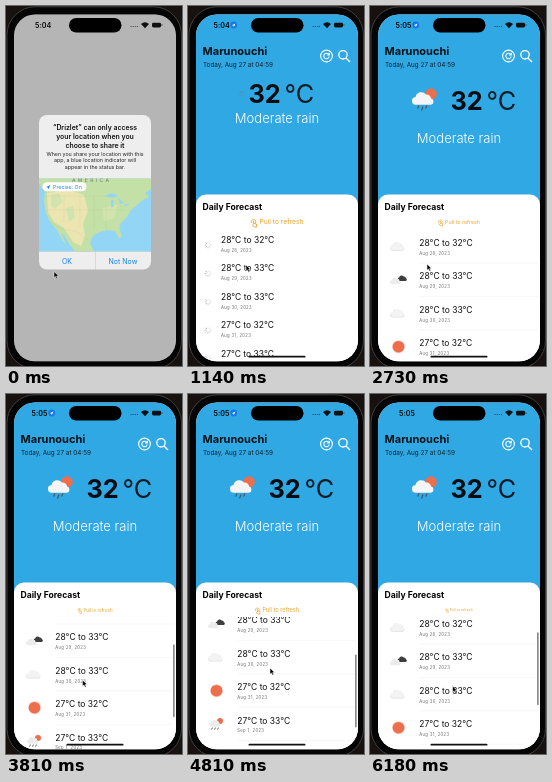
An HTML page for the animation above (6230 ms loop, 176 by 360 pixels).

```html
<!DOCTYPE html>
<html lang="en">
<head>
<meta charset="utf-8">
<title>Forecast app</title>
<style>
  html, body { margin: 0; width: 100%; height: 100%; overflow: hidden; background: #171210; }
  svg { display: block; width: 100vw; height: 100vh; }
  text { font-family: Inter, "Liberation Sans", sans-serif; }
  .b { font-weight: 700; }
  .mid { text-anchor: middle; }
</style>
</head>
<body>
<svg viewBox="0 0 176 360">
  <defs>
    <clipPath id="screen"><rect x="8" y="8.500" width="162" height="346.800" rx="21"/></clipPath>
    <clipPath id="listArea"><rect x="8" y="223" width="162" height="133"/></clipPath>
    <clipPath id="card"><rect x="33" y="109" width="112" height="154.500" rx="8"/></clipPath>
    <clipPath id="mapArea"><rect x="33" y="172.500" width="112" height="73"/></clipPath>
    <path id="cloud" d="M-6 4.500a3 3 0 0 1-.5-6a4.500 4.500 0 0 1 8-2a3.500 3.500 0 0 1 4 3.200a2.500 2.500 0 0 1 0 4.800z"/>
    <g id="cloudy">
      <use href="#cloud" transform="translate(-.3 .4) scale(.86)" fill="#dedee0"/>
      <use href="#cloud" transform="translate(-.3 -.3) scale(.82)" fill="#f3f3f4"/>
    </g>
    <g id="broken">
      <use href="#cloud" transform="translate(4.300 -1.500) scale(.56)" fill="#3e3e40"/>
      <use href="#cloud" transform="translate(-2.500 1.300) scale(.66)" fill="#ececed"/>
    </g>
    <g id="sunny"><circle r="5.800" fill="#ec6e4c" stroke="#ec6e4c" stroke-opacity=".35" stroke-width="1.400"/></g>
    <g id="rainy">
      <circle cx="3.500" cy="-3" r="3" fill="#ec6e4c"/>
      <use href="#cloud" transform="translate(-1 -.5) scale(.7)" fill="#ececed"/>
      <path d="M-4 3.500l-1 2M-1 3.500l-1 2M2 3.500l-1 2" stroke="#555" stroke-width=".9"/>
    </g>
    <g id="spinner" fill="none" stroke="#777" stroke-width=".7"></g>
  </defs>

  <rect width="176" height="360" fill="#171210"/>
  <rect x="1" y=".8" width="174.500" height="362" rx="28" fill="#050505" stroke="#454343" stroke-width=".9"/>

  <g clip-path="url(#screen)">
    <rect x="8" y="8" width="162" height="348" fill="#fff"/>

    <g id="home">
      <rect x="8" y="8" width="162" height="200" fill="#30a8e3"/>
      <text x="14.500" y="48.900" class="b" font-size="11" fill="#0b1015">Marunouchi</text>
      <text x="15" y="60.700" font-size="6.370" fill="#10222e">Today, Aug 27 at 04:59</text>
      <g fill="none" stroke="#fff" stroke-width="1.100">
        <circle cx="138.500" cy="50" r="5.900"/>
        <path d="M140.800 48.500a2.700 2.700 0 1 0 .4 2M141.300 46.800v2.200h-2.200"/>
        <circle cx="155" cy="48.800" r="4.200" stroke-width="1.300"/>
        <path d="M158 52l4 4" stroke-width="1.500"/>
      </g>
      <g id="bigIcon">
        <circle cx="61" cy="88" r="5.800" fill="#ec6e4c"/>
        <use href="#cloud" transform="translate(54 93) scale(1.300)" fill="#f4f5f6"/>
        <path d="M49 99.500l-1.500 3M53 100.500l-1.500 4M57 99.500l-1.500 3" stroke="#4d5960" stroke-width="1.300"/>
      </g>
      <use id="bigSpin" href="#spinner"/>
      <g id="temp" font-size="25.300">
        <text class="b" fill="#080c10">32</text>
        <text x="36" fill="#101c24">°C</text>
      </g>
      <text id="sky" x="89" class="mid" font-size="13.050" font-weight="300" fill="#fff">Moderate rain</text>

      <rect x="8" y="188.600" width="162" height="190" rx="10" fill="#fff"/>
      <text x="14.500" y="204.100" class="b" font-size="8.600">Daily Forecast</text>
      <g id="pull">
        <path d="M-25.500 1a2.300 2.300 0 1 1 4 0M-23.500-1.500v4M-25 2.500l2 2.500h2.500v-3l-3-1" fill="none" stroke="#f0b040" stroke-width="1"/>
        <text x="-17.500" y="2.400" font-size="6.700" fill="#eba630">Pull to refresh</text>
      </g>
      <g clip-path="url(#listArea)"><g id="list"></g></g>
      <rect id="thumb" x="167" width="1.700" height="73" rx=".85" fill="#8c8c8c"/>
    </g>

    <rect id="dim" x="8" y="8" width="162" height="348" fill="#000"/>

    <g id="dialog">
      <g clip-path="url(#card)">
        <rect x="33" y="109" width="112" height="155" fill="#eeeeee"/>
        <g class="mid" font-size="6.900" font-weight="600" fill="#111">
          <text x="89" y="123.500">“Drizlet” can only access</text>
          <text x="89" y="132.900">your location when you</text>
          <text x="89" y="142">choose to share it</text>
        </g>
        <g class="mid" font-size="5.300" fill="#222">
          <text x="89" y="149.900">When you share your location with this</text>
          <text x="89" y="156.400">app, a blue location indicator will</text>
          <text x="89" y="162.800">appear in the status bar.</text>
        </g>
        <g clip-path="url(#mapArea)">
          <rect x="33" y="172" width="112" height="74" fill="#93d5f5"/>
          <path d="M33 172H145V183L139 187L143 191L135 195L130 200L125 204L121 211L115 217L113 221L116 231L113 232L109 225L102 224L94 226L87 230L84 237L88 246H70L64 239L58 229L55 227L60 238L57 235L51 224L44 216L40 207L38 196L39 186L33 178Z" fill="#c3e0a6"/>
          <path d="M41 187L62 184L78 189L82 204L77 218L79 230L75 240L67 236L58 222L48 216L42 206Z" fill="#ece5b2"/>
          <path d="M45 189L53 187L57 196L49 203L45 200ZM60 202L67 200L69 212L63 216ZM96 202L112 198L108 212L98 215Z" fill="#d2e4ae"/>
          <path d="M99 190q7-5 13 0l-6 2zM105 194l2.500 0 0 7-2.500 0zM112 192l6 5-4 1zM118 199l6-2-5 4z" fill="#93d5f5"/>
          <path d="M39 190H100M40 204H118M58 190V216M74 190V222M88 190V224M100 198V222M44 216L58 224L70 225L82 234" fill="none" stroke="#a6b18b" stroke-opacity=".3" stroke-width=".5"/>
          <text x="66" y="176" font-size="5" letter-spacing="2.400" fill="#6d7771">AMERICA</text>
          <rect x="36.500" y="176.300" width="44" height="9" rx="4.500" fill="#fff"/>
          <path d="M40 181.200l4.200-2.200-1.800 4.500-.5-2z" fill="#1683f3"/>
          <text x="47" y="182.600" font-size="5.300" fill="#1683f3">Precise: On</text>
        </g>
        <path d="M33 245.500H145M89.500 245.500V264" stroke="#c9c9cb" stroke-width=".6"/>
        <g class="mid" font-size="7" fill="#1683f3">
          <text x="61" y="257.500">OK</text>
          <text x="117" y="257.500">Not Now</text>
        </g>
      </g>
    </g>

    <text id="clock" y="21.700" font-size="7.200" font-weight="600" fill="#080808"></text>
    <g id="locate">
      <circle cx="45.700" cy="19" r="3.400" fill="#1277e8"/>
      <path d="M43.700 19.300l3.800-1.900-1.700 3.800-.4-1.700z" fill="#fff"/>
    </g>
    <path d="M124.500 20.500h7.500" stroke="#222" stroke-opacity=".65" stroke-width="1.200" stroke-dasharray="1.200 .9"/>
    <path d="M135 18q4-3.600 8 0l-4 4.200z" fill="#111"/>
    <rect x="146" y="16.700" width="9" height="4.800" rx="1.400" fill="#111"/>
    <rect x="155.500" y="18.200" width=".8" height="1.800" fill="#333"/>
    <rect id="bar" x="60.500" y="349.800" width="57" height="1.700" rx=".85" fill="#111"/>
  </g>

  <rect x="63" y="12" width="52.500" height="14.500" rx="7.250" fill="#000"/>
  <path id="cursor" d="M0 0V6.200L1.500 4.900L2.600 7.200L3.700 6.700L2.700 4.500H4.600Z" fill="#000" stroke="#fff" stroke-width=".5"/>
</svg>

<script>
const LOOP = 6230, LEAVE = 560, OPEN = 920, LOADED = 1600;
const $ = id => document.getElementById(id);
const set = (id, attrs) => { for (const k in attrs) $(id).setAttribute(k, attrs[k]); };
const show = (id, on) => { $(id).style.display = on ? "" : "none"; };
const clamp = x => Math.max(0, Math.min(1, x));

const days = [
  [28, 32, "Aug 28", "cloudy"], [28, 33, "Aug 29", "broken"], [28, 33, "Aug 30", "cloudy"],
  [27, 32, "Aug 31", "sunny"], [27, 33, "Sep 1", "rainy"], [27, 32, "Sep 2", "rainy"]
];
// rows of [time, value...]
const scrollKeys = [[2900, 0], [3810, 27], [4250, 30], [4810, 44], [5300, 44], [6180, 7]];
const cursorKeys = [[0, 48, 265.5], [200, 48, 265.5], [560, 57, 258], [1140, 58, 259], [2730, 57, 258],
  [2950, 58, 262], [3810, 76.5, 286], [4810, 82, 274], [5300, 82, 274], [6180, 82.5, 292]];

function track(keys, t) {
  const i = keys.findIndex(k => k[0] > t);
  if (i < 0) return keys[keys.length - 1].slice(1);
  if (!i) return keys[0].slice(1);
  const a = keys[i - 1], b = keys[i];
  const p = (t - a[0]) / (b[0] - a[0]), e = p * p * (3 - 2 * p);
  return a.slice(1).map((v, j) => v + (b[j + 1] - v) * e);
}

$("spinner").innerHTML = Array.from({ length: 8 }, (_, i) =>
  `<path d="M0-1.600V-3.400" opacity="${0.2 + i * 0.09}" transform="rotate(${i * 45})"/>`).join("");

function buildList(loaded) {
  const x = loaded ? 49.3 : 33, pitch = loaded ? 33.4 : 28.4, top = loaded ? 237 : 234;
  $("list").innerHTML = days.map(([low, high, date, icon], i) => {
    const mark = loaded ? `<use href="#${icon}" x="28.500" y="3.500"/>` : `<use href="#spinner" x="20" y="5"/>`;
    const rule = loaded ? `<path d="M49.500 20H168" stroke="#efeff0" stroke-width=".5"/>` : "";
    return `<g transform="translate(0 ${top + i * pitch})">${mark}${rule}
      <text x="${x}" y="3" font-size="8.500" fill="#111">${low}°C to ${high}°C</text>
      <text x="${x}" y="11.800" font-size="4.200" letter-spacing=".33" fill="#6c6c6c">${date}, 2023</text></g>`;
  }).join("");
}

let listState = null;
function draw(t) {
  const open = t >= OPEN, loaded = t >= LOADED, located = open && t < 5750;
  if (listState !== loaded) buildList(listState = loaded);

  const fade = 1 - clamp((t - LEAVE) / 210);
  $("dialog").style.opacity = fade;
  $("dim").style.opacity = 0.29 * fade;
  show("home", open);
  show("bigIcon", loaded);
  show("bigSpin", !loaded);
  set("bigSpin", { transform: `translate(54 88) rotate(${Math.floor(t / 125) * 45})` });
  set("temp", { transform: loaded ? "translate(80.500 104)" : "translate(60.500 97)" });
  set("sky", { y: loaded ? 136.5 : 116.5 });

  // the hint shrinks to half and grows back every two seconds
  const phase = ((t - 1140) / 2000 % 1 + 1) % 1;
  const size = 0.5 + Math.abs(phase - 0.5);
  set("pull", { transform: `translate(89 216) scale(${size})` });

  const [scroll] = track(scrollKeys, t);
  set("list", { transform: `translate(0 ${-scroll})` });
  set("thumb", { y: 234 + scroll * 0.6 });
  show("thumb", t > 2900);

  set("clock", { x: located ? 25.5 : 29 });
  $("clock").textContent = t < 1950 ? "5:04" : "5:05";
  show("locate", located);
  $("bar").style.opacity = open ? 1 : 0.4 * clamp(t / 400);

  const [x, y] = track(cursorKeys, t);
  set("cursor", { transform: `translate(${x} ${y})` });
}

const start = performance.now();
function tick() {
  draw((performance.now() - start) % LOOP);
  requestAnimationFrame(tick);
}
tick();
</script>
</body>
</html>
```
